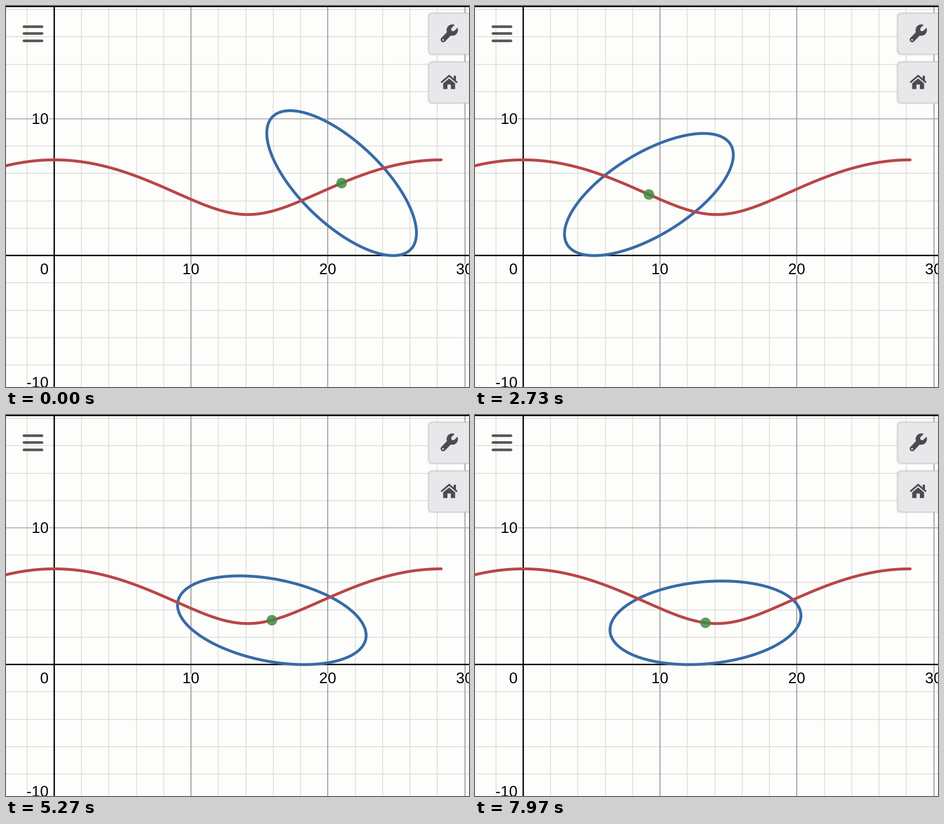
Write a matplotlib script that moves like this. It is 816 by 672 pixels and loops after 8000 ms.

```python
import numpy as np
import matplotlib.pyplot as plt
from matplotlib.animation import FuncAnimation
from matplotlib.patches import Circle, FancyBboxPatch, Polygon, Rectangle
from matplotlib.patheffects import withStroke

W, H, DPI = 816, 672, 100
FRAMES, STEP = 250, 32             # 8000 ms per loop
PX = 72 / DPI                      # one pixel in points

X0, Y0, UNIT = 85, 440.2, 24.12    # graph origin and pixels per unit
A, B, ROLL = 7, 3, 9               # ellipse semi-axes, travel per radian

PAPER, MINOR, MAJOR = "#fdfdfc", "#dededa", "#949492"
BLUE, RED, GREEN = "#386ba6", "#b84648", "#438a42"
BUTTON, EDGE, ICON, BARS = "#e8e7ea", "#d0cfd2", "#4c4b4e", "#565654"

# Turning points of the rocking: time in ms, tilt in radians
TURNS = [(-230, .945), (880, -.840), (1932, .600), (2800, -.575),
         (3690, .430), (4540, -.324), (5290, .200), (5970, -.096),
         (8000, -.0912)]

fig = plt.figure(figsize=(W / DPI, H / DPI), dpi=DPI, facecolor=PAPER)
ax = fig.add_axes([0, 0, 1, 1])
ax.set_xlim(0, W)
ax.set_ylim(H, 0)
ax.axis("off")


def px(x):
    return X0 + UNIT * x


def py(y):
    return Y0 - UNIT * y


def line(xs, ys, color, width, z, cap="butt", **kw):
    return ax.plot(xs, ys, color=color, lw=width * PX, zorder=z,
                   solid_capstyle=cap, **kw)[0]


def height(tilt):
    """Height of the centre when the ellipse touches the ground."""
    return np.sqrt((A * np.sin(tilt)) ** 2 + (B * np.cos(tilt)) ** 2)


def tilt_at(ms):
    for (t0, u0), (t1, u1) in zip(TURNS, TURNS[1:]):
        if ms <= t1:
            break
    p = (ms - t0) / (t1 - t0)
    return u0 + (u1 - u0) * (1 - np.cos(np.pi * p)) / 2


def draw_grid():
    for n in range(-4, 32, 2):
        major = n % 10 == 0
        line([px(n)] * 2, [0, H], MAJOR if major else MINOR,
             1.6, 2 if major else 1)
    for n in range(-10, 20, 2):
        major = n % 10 == 0
        line([0, W], [py(n)] * 2, "#a8a8aa" if major else MINOR,
             1.6, 2 if major else 1)
    line([X0, X0], [0, H], "black", 2.4, 3)
    line([0, W], [439.5, 439.5], "black", 2.4, 3)
    line([0, W], [1, 1], "black", 2, 3)


def label(x, y, text, ha):
    ax.text(x, y, text, ha=ha, va="baseline", fontsize=27 * PX, zorder=4,
            family="Liberation Sans", color="black",
            path_effects=[withStroke(linewidth=4 * PX, foreground=PAPER)])


def draw_button(top):
    for grow, alpha in ((3, .10), (1.5, .18)):
        ax.add_patch(FancyBboxPatch(
            (753 - grow, top + 8 - grow), 90, 56 + 2 * grow,
            boxstyle="round,pad=8", fc="#a4a4a8", ec="none",
            alpha=alpha, zorder=10))
    ax.add_patch(FancyBboxPatch((753, top + 8), 90, 56,
                                boxstyle="round,pad=8", fc=BUTTON,
                                ec=EDGE, lw=1.5 * PX, zorder=11))


def draw_wrench():
    line([770.5, 783], [59.5, 46.5], ICON, 9, 12, "round")
    ax.add_patch(Circle((786.5, 42.5), 10, fc=ICON, ec="none", zorder=12))
    line([788, 799], [41, 30], BUTTON, 7, 13, "round")
    ax.add_patch(Circle((770.3, 59.8), 1.5, fc=BUTTON, ec="none", zorder=13))


def draw_house():
    line([767, 781, 795], [135, 123, 135], ICON, 3, 12,
         solid_joinstyle="miter")
    body = [(770.5, 136.5), (781, 127.8), (791.5, 136.5), (791.5, 146.5),
            (784, 146.5), (784, 138.5), (778, 138.5), (778, 146.5),
            (770.5, 146.5)]
    ax.add_patch(Polygon(body, fc=ICON, ec="none", zorder=12))
    ax.add_patch(Rectangle((788.5, 123), 4, 9, fc=ICON, ec="none", zorder=12))


draw_grid()
label(75, 208, "10", "right")
label(75, 673, "-10", "right")
label(75, 473, "0", "right")
for n in (10, 20, 30):
    label(px(n) - .5, 473, str(n), "center")

for y in (36, 48, 60.5):
    line([31, 63], [y, y], BARS, 4.6, 12, "round")
for top in (13, 99):
    draw_button(top)
draw_wrench()
draw_house()

# Path of the centre
xs = np.linspace(-5, ROLL * np.pi, 300)
line(px(xs), py(height(xs / ROLL - np.pi / 2)), RED, 5, 7, "round")

s = np.linspace(0, 2 * np.pi, 241)
ellipse = line([], [], BLUE, 5, 5, solid_joinstyle="round")
dot = ax.add_patch(Circle((0, 0), 9.3, fc=GREEN, ec="none", alpha=.85,
                          zorder=8))


def update(i):
    u = tilt_at(i * STEP)
    x, y = ROLL * (np.pi / 2 + u), height(u)
    major, minor = A * np.cos(s), B * np.sin(s)
    ellipse.set_data(px(x + major * np.cos(u) + minor * np.sin(u)),
                     py(y - major * np.sin(u) + minor * np.cos(u)))
    dot.center = px(x), py(y)
    return ellipse, dot


anim = FuncAnimation(fig, update, frames=FRAMES, interval=STEP,
                     init_func=lambda: update(0), repeat=True,
                     repeat_delay=0, blit=False)
plt.show()
```
